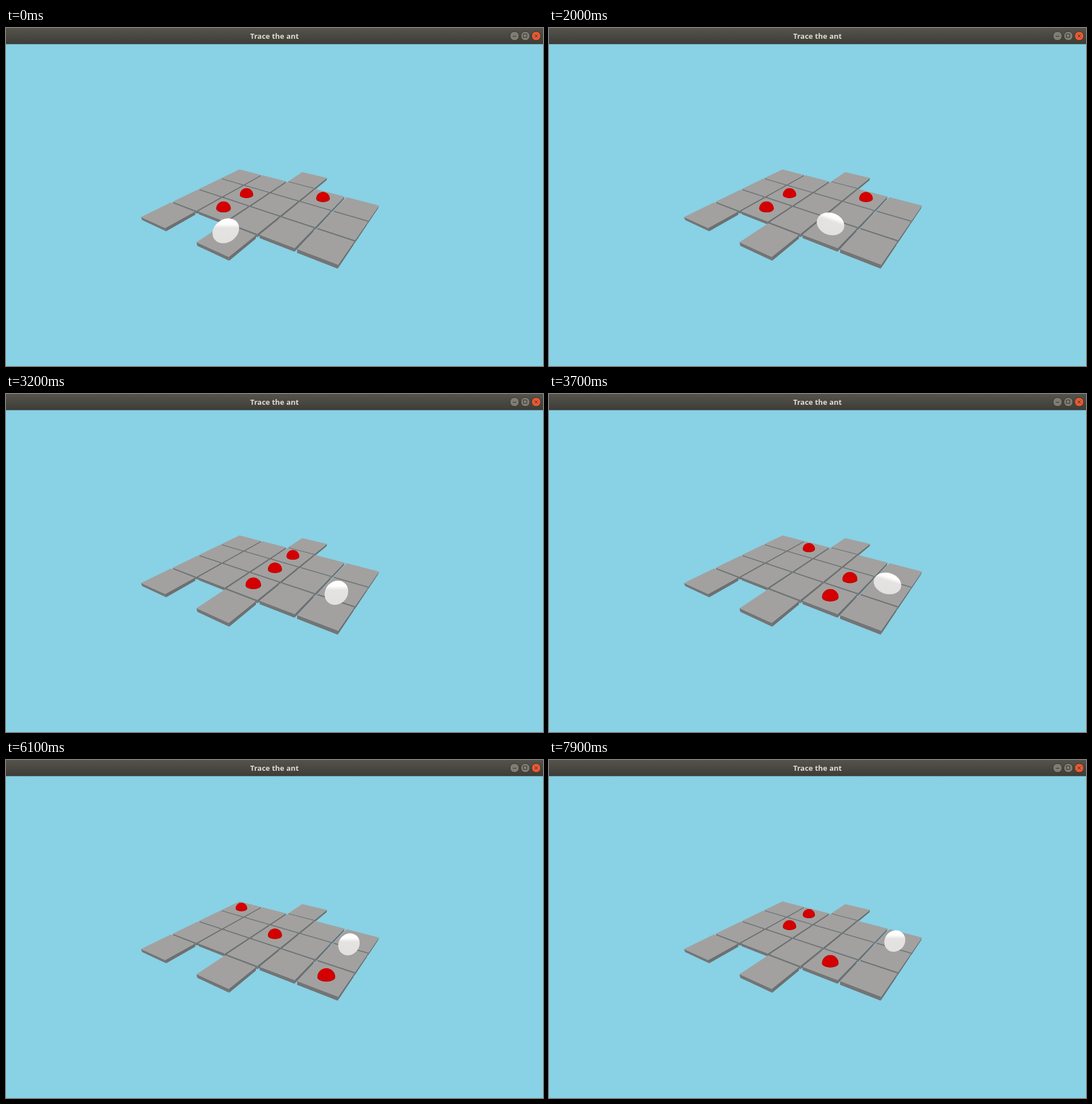
Animation of 943 by 594 pixels, one loop 8 s. Source, as an HTML page with a canvas:

```html
<!DOCTYPE html>
<html lang="en">
<head>
<meta charset="utf-8">
<title>Trace the ant</title>
<style>
  html, body { margin: 0; width: 100%; height: 100%; overflow: hidden; background: #89d1e5; }
  canvas { position: absolute; left: 0; top: 0; display: block; }
  .title {
    position: absolute; left: 0; top: 0; width: 943px; height: 28px;
    font: bold 13px/28px "Open Sans", "Noto Sans", sans-serif;
    color: #dfdbd2; text-align: center;
  }
</style>
</head>
<body>
<canvas id="stage" width="943" height="594"></canvas>
<div class="title">Trace the ant</div>
<script>
const ctx = document.getElementById("stage").getContext("2d");
const LOOP = 8000, STEP = 100, MOVE = 200;
const GAP = 0.03, THICKNESS = 3.87, CENTER = 471.5;

// First and last row of each board column.
const COLUMNS = [[0, 4], [0, 3], [-1, 4], [0, 3], [0, 3]];

// Each turn: the ball slides first, then the red pieces follow.
const TURNS = [
  { start: 0, ball: [2, 3], reds: [[1, 1], [1, 2], [3, 0]] },
  { start: 600, ball: [2, 2], reds: [[0, 1], [0, 2], [4, 0]] },
  { start: 1600, ball: [3, 2], reds: [[1, 1], [1, 2], [3, 0]] },
  { start: 2204, ball: [4, 2], reds: [[2, 1], [2, 2], [2, 0]] },
  { start: 3100, ball: [4, 1], reds: [[3, 1], [3, 2], [1, 0]] },
  { start: 4700, ball: [4, 0], reds: [[2, 1], [4, 2], [0, 0]] },
  { start: 5960, ball: [4, 1], reds: [[1, 1], [3, 2], [1, 0]] },
  { start: 7800, ball: [4, 0], reds: [[1, 1], [3, 2], [1, 0]] }
];
// The ball swings between lying along the rows and along the columns.
const SWINGS = [1100, 2700, 3700, 4400, 5300, 5600, 6800, 7400];
// Ticks on which the picture stalls.
const STALLS = [2600, 4800, 6000, 6400];

const clamp = x => Math.min(1, Math.max(0, x));
const mix = (a, b, k) => a.map((v, i) => v + (b[i] - v) * k);

// Perspective view of the board plane, measured from its back corner.
function project(u, v) {
  const p = u - GAP, q = v - GAP;
  const w = 1 - 0.04594 * p - 0.07246 * q;
  return {
    x: (410 + 19.5 * p - 61.08 * q) / w,
    y: (248.4 - 1.45 * p - 2.81 * q) / w,
    w
  };
}

// Uprights spread away from the middle of the picture as they rise.
function lift(p, height) {
  return {
    x: p.x + (p.x - CENTER) * height * 0.0023,
    y: p.y - height / p.w,
    w: p.w
  };
}

const lower = p => lift(p, -THICKNESS);

function polygon(points, color) {
  ctx.beginPath();
  points.forEach(p => ctx.lineTo(p.x, p.y));
  ctx.closePath();
  ctx.fillStyle = color;
  ctx.fill();
}

function drawTile(col, row) {
  const l = col + GAP, r = col + 1 - GAP, t = row + GAP, b = row + 1 - GAP;
  const back = project(l, t), right = project(r, t);
  const front = project(r, b), left = project(l, b);
  polygon([right, front, lower(front), lower(right)], "#6f6f6f");
  polygon([left, front, lower(front), lower(left)], "#757474");
  polygon([back, right, front, left], "#a2a1a0");
}

function drawBoard() {
  for (let row = -1; row < 4; row++)
    COLUMNS.forEach(([first, end], col) => {
      if (row >= first && row < end) drawTile(col, row);
    });
}

function dome(x, y, rx, top, bottom, color) {
  ctx.beginPath();
  ctx.ellipse(x, y, rx, top, 0, Math.PI, 2 * Math.PI);
  ctx.ellipse(x, y, rx, bottom, 0, 0, Math.PI);
  ctx.fillStyle = color;
  ctx.fill();
}

function drawRed([col, row]) {
  const { x, y, w } = project(col + 0.5, row + 0.5);
  const r = 9.65 / w;
  dome(x, y, r, r, r * 0.5, "#a80000");
  dome(x, y - 0.3, r * 0.96, r * 0.96, r * 0.46, "#d40000");
}

function drawBall([col, row], alongRow) {
  const u = col + 0.5, v = row + 0.5;
  const { x, y, w } = lift(project(u, v), 8.7);
  const du = alongRow ? 0.5 : 0, dv = 0.5 - du;
  const a = project(u - du, v - dv), b = project(u + du, v + dv);
  const dx = (b.x - a.x) * w, dy = (b.y - a.y) * w;

  // Outline of a round body stretched along its projected axis.
  const stretch = 0.052, round = 12.8;
  const angle = Math.atan2(dy, dx);
  const minor = round / w;
  const major = Math.sqrt(round * round + stretch * (dx * dx + dy * dy)) / w;

  ctx.save();
  ctx.translate(x, y);
  const tilt = alongRow ? angle : 0;
  ctx.rotate(tilt);
  const light = ctx.createLinearGradient(0, -minor, 0, minor);
  light.addColorStop(0, "#ffffff");
  light.addColorStop(0.2, "#fdfdfd");
  light.addColorStop(0.38, "#e4e3e2");
  light.addColorStop(1, "#e2e1e0");
  ctx.beginPath();
  ctx.ellipse(0, 0, major, minor, angle - tilt, 0, 2 * Math.PI);
  ctx.fillStyle = light;
  ctx.fill();
  ctx.restore();
}

function drawButton(x, color, icon) {
  ctx.beginPath();
  ctx.arc(x, 14, 8, 0, 2 * Math.PI);
  ctx.fillStyle = color;
  ctx.fill();
  ctx.strokeStyle = "#33322d";
  ctx.lineWidth = 1;
  ctx.stroke();
  ctx.stroke(new Path2D(icon));
}

function drawTitleBar() {
  const bar = ctx.createLinearGradient(0, 0, 0, 28);
  bar.addColorStop(0, "#55534b");
  bar.addColorStop(1, "#3d3c37");
  ctx.fillStyle = bar;
  ctx.fillRect(0, 0, 943, 28.4);
  drawButton(893, "#7f7c73", "M890 14.5h6");
  drawButton(912, "#7f7c73", "M908.5 10.5h6v6h-6z");
  drawButton(931, "#e65a32", "M928.5 11.5l5 5M933.5 11.5l-5 5");
}

function draw(time) {
  let t = Math.floor(time / STEP) * STEP;
  if (STALLS.includes(t)) t -= STEP;

  const index = TURNS.findLastIndex(turn => t >= turn.start);
  const now = TURNS[index], before = TURNS[Math.max(0, index - 1)];
  const slide = clamp((t - now.start) / MOVE);
  const follow = clamp((t - now.start) / MOVE - 1);
  const swings = SWINGS.filter(s => t >= s).length;

  ctx.fillStyle = "#89d1e5";
  ctx.fillRect(0, 0, 943, 594);
  drawBoard();
  now.reds.forEach((red, i) => drawRed(mix(before.reds[i], red, follow)));
  drawBall(mix(before.ball, now.ball, slide), swings % 2 === 1);
  drawTitleBar();
}

const begin = performance.now();
function tick() {
  draw((performance.now() - begin) % LOOP);
  requestAnimationFrame(tick);
}
tick();
</script>
</body>
</html>
```
